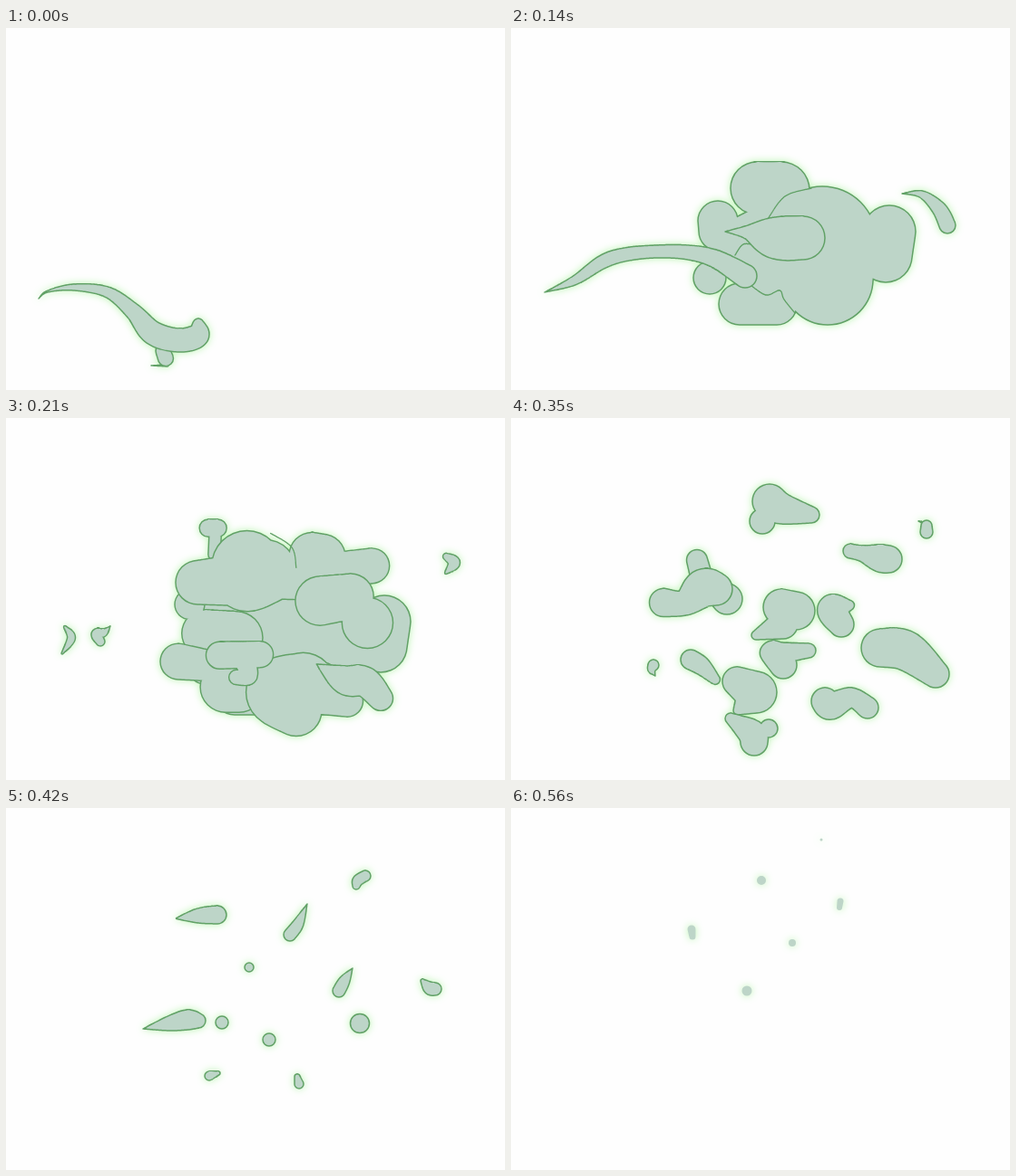
These frames come from a looping animation (550 by 400 pixels, 0.63 s). An HTML page with a canvas:

```html
<!DOCTYPE html>
<html lang="en">
<head>
<meta charset="utf-8">
<title>Smoke puff</title>
<style>
html, body { margin: 0; width: 100%; height: 100%; overflow: hidden; background: #fefefe; }
canvas { display: block; filter: drop-shadow(0 0 4px #bdf6b4); }
</style>
</head>
<body>
<canvas id="stage" width="550" height="400"></canvas>
<script>
const ctx = document.getElementById('stage').getContext('2d');
const STEP = 70, STEPS_PER_SEGMENT = 30;
const SMOKE = '#bdd5c8', EDGE = '#61a166', HALF_LINE = 0.75;

function spline(a, b, c, d, t) {
  return b + t * ((c - a) + t * (2 * a - 5 * b + 4 * c - d + t * (3 * (b - c) + d - a))) / 2;
}

// A chain is a smooth run of circles through a few key circles: x, y, radius, ...
function circlesAlong(chain) {
  const count = chain.length / 3;
  const key = (i, part) => chain[3 * Math.max(0, Math.min(count - 1, i)) + part];
  const total = Math.max(1, (count - 1) * STEPS_PER_SEGMENT);
  return Array.from({ length: total + 1 }, (_, step) => {
    const i = Math.floor(step / STEPS_PER_SEGMENT), t = step / STEPS_PER_SEGMENT - i;
    return [0, 1, 2].map(part =>
      spline(key(i - 1, part), key(i, part), key(i + 1, part), key(i + 2, part), t));
  });
}

function fillCircles(circles, grow, color) {
  ctx.beginPath();
  for (const [x, y, r] of circles) {
    if (r + grow <= 0) continue;
    ctx.moveTo(x + r + grow, y);
    ctx.arc(x, y, r + grow, 0, 2 * Math.PI);
  }
  ctx.fillStyle = color;
  ctx.fill();
}

// One outlined shape, merged from all its chains.
function puff(...chains) {
  const circles = chains.flatMap(circlesAlong);
  fillCircles(circles, HALF_LINE, EDGE);
  fillCircles(circles, -HALF_LINE, SMOKE);
}

// A chain of zero radius leaves only its line.
function crease(...xy) {
  puff(xy.flatMap((value, i) => i % 2 ? [value, 0] : [value]));
}

function dot(...chain) {
  fillCircles(circlesAlong(chain), 0, SMOKE);
}

function transformed(x, y, scale, turn, paint) {
  ctx.save();
  ctx.translate(x, y);
  ctx.rotate(turn);
  ctx.scale(scale, scale);
  ctx.translate(-x, -y);
  paint();
  ctx.restore();
}

function wisp() {
  puff([173, 357, 8, 176, 365, 8.5], [160, 373, 0, 178, 373, 1]);
  puff([36, 299, 0, 46, 291, 1, 75, 286.5, 3.5, 112, 292, 6, 140, 313, 9,
    162, 337, 13, 190, 345, 13, 211, 340, 12.5, 212, 327, 6]);
}

function cloudBody() {
  puff(
    [271, 177, 29, 298, 179, 31],
    [228, 213, 22, 228, 225, 21],
    [219, 276, 18],
    [252, 305, 23, 293, 306, 22],
    [240, 240, 24, 300, 250, 60],
    [343, 235, 60, 349, 278, 50],
    [417, 225, 29, 413, 252, 29]);
}

function cloud() {
  cloudBody();
  crease(283, 211, 302, 186, 331, 177);
  crease(313, 315, 301, 300, 296, 290, 281, 295, 264, 284);
  crease(247, 251, 256, 239, 270, 240);
  puff([236, 225, 0, 262, 226, 8, 292, 232, 23, 322, 232, 24]);
  puff([37, 292, 0, 70, 279, 5, 100, 259, 7.5, 125, 250.5, 7.5, 160, 247, 7,
    195, 248, 8, 225, 255, 10, 258, 274, 13]);
}

function fleck() {
  puff([431, 183, 0, 453, 184, 4, 472, 200, 8, 481, 218, 9]);
}

function ring() {
  puff([220, 118, 10, 231, 118, 10], [228, 125, 7, 227, 148, 7]);
  puff([199, 205, 17], [217, 238, 27, 252, 243, 30]);
  puff(
    [338, 149, 26, 350, 151, 26],
    [406, 161, 20, 360, 168, 22],
    [264, 161, 40, 264, 175, 38, 284, 168, 37],
    [208, 180, 25, 240, 178, 28],
    [300, 182, 17, 340, 180, 20]);
  crease(291, 124, 315, 140, 320, 163);
  puff([186, 270, 20.5, 215, 274, 18], [240, 299, 29, 255, 299, 29]);
  puff(
    [320, 326, 29, 300, 305, 37, 328, 296, 36],
    [345, 300, 30, 378, 315, 18]);
  puff([233, 263, 15.5, 279, 262, 15], [252, 288, 8.5, 266, 287, 9.5, 263, 272, 12]);
  puff([343, 273, 0, 375, 291, 16, 398, 293, 17, 416, 312, 14]);
  puff([347, 201, 28, 382, 196, 26], [401, 226, 29]);
}

function shards() {
  puff([485, 153, 3.5, 494, 160, 6.5, 485, 171, 1.5]);
  puff([65, 231, 1.5, 72, 243, 4.5, 62, 260, 1]);
  puff([115, 230, 0, 108, 237, 4, 100, 239, 6, 104, 247, 5]);
}

function clumps() {
  puff([285, 92, 19, 298, 100, 17, 331, 107, 9], [277, 114, 14]);
  puff([374, 147, 8, 388, 150, 9, 407, 155, 15, 416, 156, 15]);
  puff([458, 119, 6, 458, 126, 7], [449, 114, 0, 455, 116, 1]);
  puff([205, 157, 11.5, 209, 172, 12]);
  puff([226, 190, 14, 238, 200, 17]);
  puff([168, 204, 15.5, 192, 204, 14, 212, 188, 21, 226, 189, 18]);
  puff([275, 262, 0, 289, 260, 14, 300, 273, 15], [295, 260, 12, 328, 257, 8]);
  puff([298, 209, 20, 314, 213, 21], [270, 240, 5, 300, 228, 16]);
  puff([373, 207, 5.5, 354, 211, 16, 364, 228, 14]);
  puff([407, 254, 21, 435, 257, 22, 468, 283, 15]);
  puff([157, 273, 6, 155, 278, 4, 159, 285, 0]);
  puff([198, 267, 11, 210, 274, 10, 225, 289, 5.5]);
  puff([249, 291, 16, 270, 303, 23], [270, 305, 21, 250, 323, 5]);
  puff([242, 332, 6, 265, 348, 15, 268, 358, 15], [284, 343, 10]);
  puff([346, 313, 15, 353, 318, 15, 375, 309, 11, 393, 320, 12]);
}

// Each bit shrinks towards its first, thickest circle.
function bits(size) {
  const bit = (...chain) =>
    transformed(chain[0], chain[1], size, 0, () => puff(chain));
  bit(233, 118, 10, 212, 119, 8, 188, 122, 0.5);
  bit(313, 140, 7, 322, 128, 6, 332, 106, 0);
  bit(396, 75, 6, 388, 80, 6, 386, 86, 4);
  bit(268, 176, 5);
  bit(367, 202, 7, 373, 191, 6, 382, 177, 0);
  bit(473, 200, 7, 467, 199, 7, 459, 191, 2);
  bit(212, 235, 8, 200, 234, 11, 180, 238, 8, 151, 244, 0);
  bit(238, 237, 7);
  bit(290, 256, 7);
  bit(390, 238, 10.5);
  bit(224, 296, 5, 234, 293, 2);
  bit(323, 305, 5, 321, 297, 3);
}

function dots() {
  dot(276, 80, 5);
  dot(363, 103, 3.5, 362, 110, 3);
  dot(199, 134, 4.5, 200, 142, 3.5);
  dot(310, 149, 4);
  dot(260, 202, 5.5);
  dot(342, 35, 1.5);
}

const poses = [
  wisp,
  () => transformed(37, 292, 0.75, 0.1, cloud),
  () => { cloud(); fleck(); },
  () => {
    cloudBody();
    transformed(315, 238, 0.97, 0, ring);
    shards();
  },
  () => { ring(); shards(); },
  clumps,
  () => bits(1),
  () => {
    ctx.save();
    ctx.translate(0, -45);
    bits(0.55);
    ctx.restore();
  },
  dots
];

let shown = -1;
function tick(now) {
  const index = Math.floor(now / STEP) % poses.length;
  if (index !== shown) {
    ctx.clearRect(0, 0, 550, 400);
    poses[index]();
    shown = index;
  }
  requestAnimationFrame(tick);
}
tick(performance.now());
</script>
</body>
</html>
```
